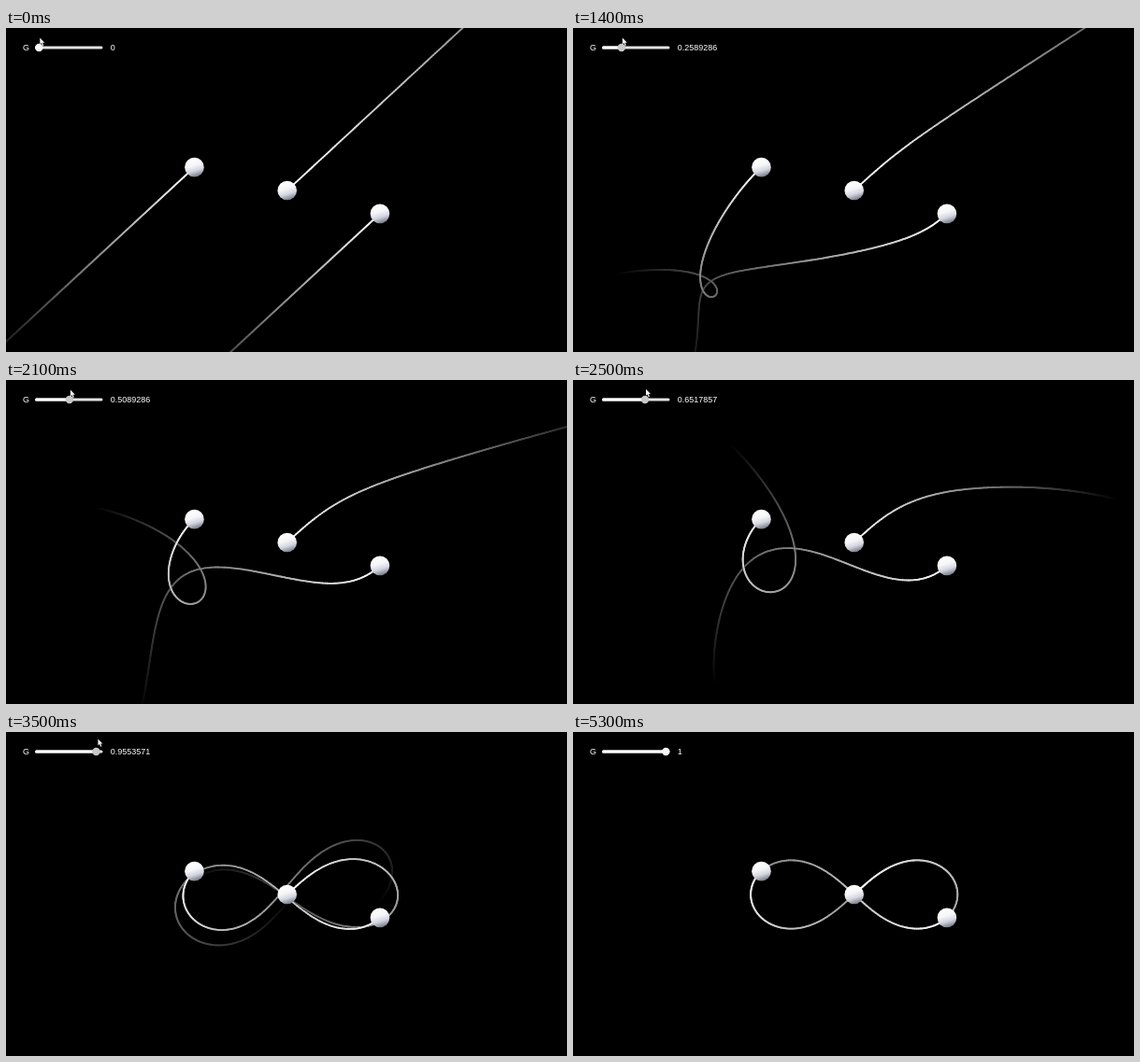
An HTML page with a canvas that plays this animation: 600x347 px, repeating every 6.5 s.

```html
<!DOCTYPE html>
<html>
<head>
<meta charset="utf-8">
<title>Three bodies</title>
<style>
html, body { margin: 0; width: 600px; height: 347px; overflow: hidden; background: #000; }
canvas { display: block; }
</style>
</head>
<body>
<canvas id="stage" width="600" height="347"></canvas>
<script>
const ctx = document.getElementById('stage').getContext('2d');
const LOOP = 6500, SCALE = 102.3, CX = 300.7, CY = 174;
const SPAN = 4.8, DT = 0.01;

// figure-eight starting conditions: outer bodies mirrored, no net momentum
const [px, py, vx, vy] = [0.97000436, -0.24308753, 0.46620369, 0.43236573];
const START = [[-px, -py], [px, py], [0, 0]];
const SPEED = [[-vx, -vy], [-vx, -vy], [2 * vx, 2 * vy]];

// slider value in 112ths at a few moments of the drag
const DRAG = [[300, 0], [1000, 14], [1700, 41], [2500, 73], [3100, 101], [3800, 112]];

const ramp = (t, from, to) => Math.min(1, Math.max(0, (t - from) / (to - from)));
const toScreen = ([x, y]) => [CX + x * SCALE, CY - y * SCALE];
const gray = c => `rgb(${c},${c},${c})`;

function sliderValue(t) {
  let value = 0;
  for (let i = 1; i < DRAG.length; i++) {
    const [t0, a] = DRAG[i - 1], [t1, b] = DRAG[i];
    value += (b - a) * ramp(t, t0, t1);
  }
  return Math.round(value) / 112;
}

function forces(pos, G) {
  const acc = pos.map(() => [0, 0]);
  for (let i = 0; i < 3; i++) {
    for (let j = 0; j < i; j++) {
      const dx = pos[j][0] - pos[i][0], dy = pos[j][1] - pos[i][1];
      const f = G / Math.hypot(dx, dy) ** 3;
      acc[i][0] += f * dx; acc[i][1] += f * dy;
      acc[j][0] -= f * dx; acc[j][1] -= f * dy;
    }
  }
  return acc;
}

function simulate(G) {
  const pos = START.map(p => [...p]), vel = SPEED.map(v => [...v]);
  const paths = pos.map(p => [toScreen(p)]);
  const kick = acc => vel.forEach((v, i) => {
    v[0] += acc[i][0] * DT / 2;
    v[1] += acc[i][1] * DT / 2;
  });
  let acc = forces(pos, G);
  for (let n = 1; n <= SPAN / DT; n++) {
    kick(acc);
    pos.forEach((p, i) => { p[0] += vel[i][0] * DT; p[1] += vel[i][1] * DT; });
    acc = forces(pos, G);
    kick(acc);
    if (n % 2 === 0) pos.forEach((p, i) => paths[i].push(toScreen(p)));
  }
  return paths;
}

// brightness fades along the arc length
function drawTrail(path) {
  const lengths = path.slice(1).map(([x, y], i) => Math.hypot(x - path[i][0], y - path[i][1]));
  const total = lengths.reduce((a, b) => a + b, 0);
  let run = 0;
  lengths.forEach((len, i) => {
    ctx.strokeStyle = gray(Math.round(255 * (1 - (run + len / 2) / total)));
    run += len;
    ctx.beginPath();
    ctx.moveTo(...path[i]);
    ctx.lineTo(...path[i + 1]);
    ctx.stroke();
  });
}

function disc(x, y, r, fill) {
  ctx.fillStyle = fill;
  ctx.beginPath();
  ctx.arc(x, y, r, 0, 7);
  ctx.fill();
}

// lit from above, slightly from the left
function drawBall(p) {
  const [x, y] = toScreen(p);
  const shade = ctx.createLinearGradient(x - 3, y - 10, x + 3, y + 10);
  shade.addColorStop(0, '#fff');
  shade.addColorStop(0.4, '#f6f6f8');
  shade.addColorStop(0.68, '#d3d6df');
  shade.addColorStop(1, '#747887');
  disc(x, y, 10.3, shade);
}

function bar(x, w, fill) {
  ctx.fillStyle = fill;
  ctx.beginPath();
  ctx.roundRect(x, 19.5, w, 3, 1.5);
  ctx.fill();
}

function drawSlider(knob, G, t) {
  ctx.font = '9px "Liberation Sans", Arial, sans-serif';
  ctx.fillStyle = '#fff';
  ctx.fillText('G', 18, 24.3);
  ctx.fillText(String(+G.toFixed(7)), 111.7, 24.3);
  bar(31, 72.5, '#e2e2e2');
  bar(31, knob - 31, '#fff');
  const pressed = ramp(t, 300, 400) - ramp(t, 4500, 4800);
  disc(knob, 21, 4.2, gray(Math.round(248 - 48 * pressed)));
}

// follows the knob, drifts up and right, then leaves over the top edge
function drawCursor(knob, t) {
  const leave = ramp(t, 4900, 5300);
  if (leave === 1) return;
  ctx.save();
  ctx.translate(
    knob + 1 + 4.7 * ramp(t, 3300, 4300) + 110 * leave ** 2,
    10.5 - 5 * ramp(t, 2200, 4300) - 7 * leave
  );
  ctx.fillStyle = '#f4f4f4';
  ctx.fill(new Path2D('M0 0V7L1.6 5.6L2.8 8.4L4 7.9L2.8 5.2H5Z'));
  ctx.restore();
}

const begin = performance.now();
let lastG, paths;

function frame() {
  const t = Math.floor((performance.now() - begin) % LOOP / 100) * 100;
  const G = sliderValue(t), knob = 35.3 + G * 64;
  if (G !== lastG) paths = simulate(lastG = G);
  ctx.fillStyle = '#000';
  ctx.fillRect(0, 0, 600, 347);
  ctx.lineWidth = 1.8;
  ctx.lineCap = 'round';
  ctx.globalCompositeOperation = 'lighten';
  paths.forEach(drawTrail);
  ctx.globalCompositeOperation = 'source-over';
  START.forEach(drawBall);
  drawSlider(knob, G, t);
  drawCursor(knob, t);
  requestAnimationFrame(frame);
}
frame();
</script>
</body>
</html>
```
